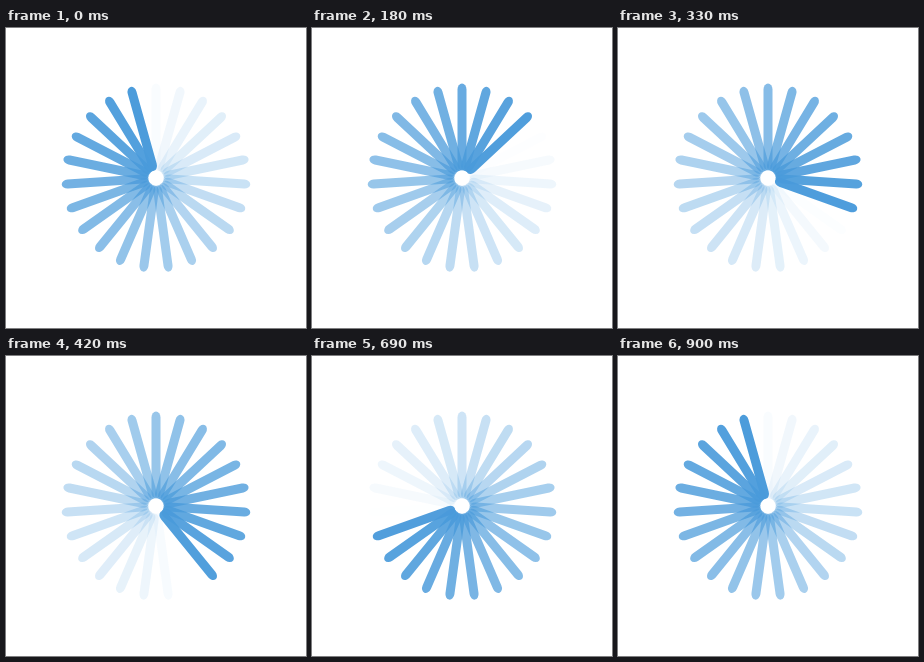
Recreate the animation shown at these times as an HTML page. Size 300 by 300 pixels, loop 930 ms.

```html
<!DOCTYPE html>
<html lang="en">
<head>
<meta charset="utf-8">
<title>Spinner</title>
<style>
  html, body { margin: 0; width: 100%; height: 100%; overflow: hidden; background: #fff; }
  svg { display: block; width: 100vw; height: 100vh; }
  rect { fill: #4a9bdb; }
</style>
</head>
<body>
<svg viewBox="0 0 300 300"></svg>
<script>
const COUNT = 23;
const LOOP = 930;   // whole loop, including the hold at its start
const CYCLE = 900;  // time for one turn of the fade
const STEP = 30;

const svg = document.querySelector('svg');
const spokes = Array.from({ length: COUNT }, (_, i) => {
  const bar = document.createElementNS('http://www.w3.org/2000/svg', 'rect');
  const attrs = {
    x: 145.5, y: 55.5, width: 9, height: 87, rx: 4.5, ry: 6,
    transform: `rotate(${i * 360 / COUNT} 150 150)`
  };
  for (const name in attrs) bar.setAttribute(name, attrs[name]);
  return svg.appendChild(bar);
});

// Each spoke lights up at its turn, then fades linearly to nothing.
function draw(time) {
  const step = Math.floor((time % LOOP) / STEP);
  const turn = step < 2 ? CYCLE - STEP : (step - 1) * STEP;
  spokes.forEach((bar, i) => {
    const age = (turn / CYCLE - i / COUNT + 1) % 1;
    bar.setAttribute('opacity', (1 - age).toFixed(4));
  });
}

let start;
function tick(now) {
  start ??= now;
  draw(now - start);
  requestAnimationFrame(tick);
}
draw(0);
requestAnimationFrame(tick);
</script>
</body>
</html>
```
